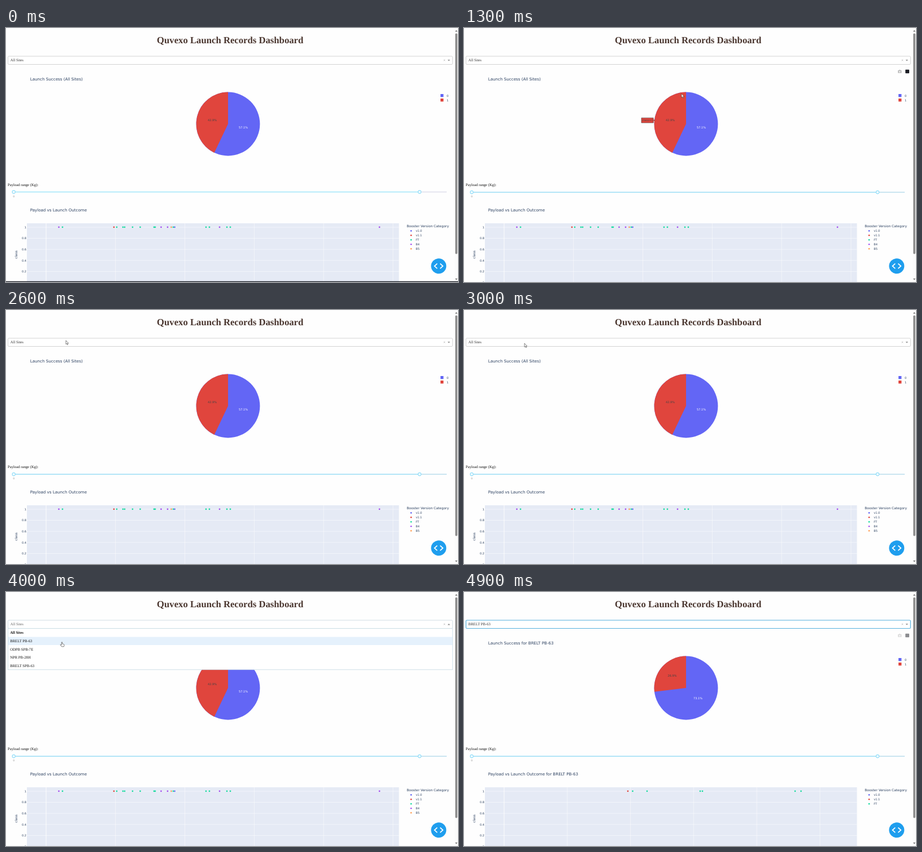
Write an HTML page that moves like this. It is 800x450 px and loops after 5 s.

```html
<!DOCTYPE html>
<html lang="en">
<head>
<meta charset="utf-8">
<title>Launch Records Dashboard</title>
<style>
html, body { margin: 0; width: 100%; height: 100%; overflow: hidden; background: #fefefe; }
svg { display: block; width: 800px; height: 450px; text-rendering: geometricPrecision; }
.serif { font-family: "Liberation Serif", "Times New Roman", serif; }
.sans { font-family: "DejaVu Sans", Verdana, sans-serif; }
</style>
</head>
<body>
<svg id="stage" viewBox="0 0 800 450"></svg>
<script>
const LOOP = 5000, STEP = 100;
const OPEN = 3400, PICK = 4400, UPDATE = 4500;
const BLUE = '#6366f5', RED = '#e0453d', GREEN = '#18dba0', PURPLE = '#a34ef0', ORANGE = '#ffa15a';
const NAVY = '#2a3f5f';
const SITES = ['All Sites', 'BRELT PB-63', 'ODPB SPB-7E', 'NPR PB-28H', 'BRELT SPB-63'];
const BOOSTERS = [['v1.0', BLUE], ['v1.1', RED], ['FT', GREEN], ['B4', PURPLE], ['B5', ORANGE]];

const ALL = {
  title: '', share: .571, labels: [420, 176.5, 365, 163.5],
  grid: [71, 122.8], boosters: 5,
  dots: [[PURPLE, 93.5, 274.5, 286, 378, 661], [RED, 191],
    [GREEN, 100, 196, 207, 210, 224, 237.5, 262, 264, 296, 354, 360, 391, 397],
    [ORANGE, 292.5], [BLUE, 298.5]]
};
const ONE = {
  title: ' for ' + SITES[1], share: .731, labels: [414, 188.5, 368.5, 148.5],
  grid: [71, 111.8], boosters: 3,
  dots: [[RED, 290], [GREEN, 298.5, 324, 418, 422, 586, 596.5]]
};

// Pointer path: time, x, y
const PATH = [[100, 430, 455], [600, 385, 116.5], [1300, 385, 116.5], [1800, 287, 87.5],
  [2400, 109, 53], [2600, 106, 54], [3000, 107, 59], [3400, 107, 59], [3500, 106, 62],
  [3900, 106, 63], [4000, 99, 88.5], [4400, 99, 88.5], [4500, 90, 90], [4700, -20, 95]];

const rect = (x, y, w, h, fill, more = '') =>
  `<rect x="${x}" y="${y}" width="${w}" height="${h}" fill="${fill}" ${more}/>`;
const circle = (x, y, r, fill, more = '') =>
  `<circle cx="${x}" cy="${y}" r="${r}" fill="${fill}" ${more}/>`;
const path = (d, fill, more = '') => `<path d="${d}" fill="${fill}" ${more}/>`;
const line = (d, color, width) => path(d, 'none', `stroke="${color}" stroke-width="${width}"`);
const text = (s, x, y, size, fill, font = 'sans', more = '') =>
  `<text x="${x}" y="${y}" font-size="${size}" fill="${fill}" class="${font}" ${more}>${s}</text>`;
const MID = 'text-anchor="middle"', END = 'text-anchor="end"';

function pointerAt(t) {
  const i = PATH.findIndex(p => p[0] > t);
  if (i < 1) return null;
  const [a, b] = [PATH[i - 1], PATH[i]];
  const k = (t - a[0]) / (b[0] - a[0]);
  return [a[1] + (b[1] - a[1]) * k, a[2] + (b[2] - a[2]) * k];
}

function pie({ title, share, labels: [bx, by, rx, ry] }) {
  const cx = 393, cy = 170, r = 56.4, a = share * 2 * Math.PI;
  const x = cx + r * Math.sin(a), y = cy - r * Math.cos(a);
  const pct = v => (v * 100).toFixed(1) + '%';
  return text('Launch Success' + (title || ' (All Sites)'), 42.7, 93, 7.14, NAVY) +
    circle(cx, cy, r, BLUE) +
    path(`M${cx} ${cy}L${x} ${y}A${r} ${r} 0 0 1 ${cx} ${cy - r}Z`, RED) +
    text(pct(share), bx, by + 1.8, 5.04, '#fff', 'sans', MID) +
    text(pct(1 - share), rx, ry + 1.8, 5.04, '#444', 'sans', MID) +
    [BLUE, RED].map((c, i) => rect(769, 117 + 8 * i, 5.3, 5.3, c) +
      text(i, 780, 121.7 + 8 * i, 5.04, NAVY)).join('');
}

function scatter({ title, grid: [start, gap], boosters, dots }) {
  let s = text('Payload vs Launch Outcome' + title, 42.7, 325, 7.1, NAVY) +
    rect(37, 346, 658.5, 104, '#e5eaf5');
  for (let x = start; x < 695; x += gap)
    s += line(`M${x} 346V450`, '#fff', x === start ? .9 : .5);
  for (let i = 0; i < 6; i++) {
    const y = 353 + 19.6 * i;
    s += line(`M37 ${y}H695.5`, '#fff', .5) +
      text(+(1 - i / 5).toFixed(1), 36, y + 1.8, 5.04, NAVY, 'sans', END);
  }
  s += text('class', 0, 0, 5.88, NAVY, 'sans', MID + ' transform="translate(20 401.5) rotate(-90)"');
  for (const [color, ...xs] of dots)
    s += xs.map(x => circle(x, 352.8, 1.4, color)).join('');
  s += text('Booster Version Category', 709.3, 353.3, 5.86, NAVY);
  return s + BOOSTERS.slice(0, boosters).map(([name, color], i) =>
    circle(717, 359.4 + 7.95 * i, 1.35, color) +
    text(name, 725.3, 361.3 + 7.95 * i, 5.04, NAVY)).join('');
}

function slider(first) {
  const y = first ? 290.5 : 291;
  const knob = x => circle(x, y, 2.6, '#fff', 'stroke="#8fdcf8" stroke-width="1.1"');
  return text('Payload range (Kg):', 3, 279.7, 6.7, '#111', 'serif') +
    line(`M732 ${y}H780`, first ? '#e6e6f0' : '#b9dcec', first ? 2 : 1.5) +
    line(`M14 ${y}H732`, first ? '#b5ecfb' : '#9adcf5', first ? 2 : 1.6) +
    knob(13.7) + knob(732) + text('0', 13.7, 300, 5, '#888', 'serif', MID);
}

function dropdown(t, open, row) {
  const picked = t >= PICK;
  let s = rect(3.5, 50, 786.8, 14.5, '#fff', picked
    ? 'rx="1.5" stroke="#55b0de" stroke-width="1.2"'
    : `rx="1.5" stroke="${open ? '#c5d3dc' : '#c8c8c8'}" stroke-width=".8"`);
  s += text(SITES[picked ? 1 : 0], 7.7, 59.3, 6.7, open ? '#666' : '#333', 'serif') +
    line('M774.6 55.8l2.6 2.6m0 -2.6l-2.6 2.6', '#aaa', .6) +
    path(open ? 'M781.6 58.4h4.4l-2.2 -2.3Z' : 'M781.6 56.2h4.4l-2.2 2.3Z', '#888');
  if (!open) return s;
  if (t < OPEN + 500) s += line('M8 54V60', '#222', .6);
  s += rect(3.5, 64.7, 786.8, 73, '#fff', 'stroke="#c5dbe4" stroke-width=".8"') +
    rect(4, 65 + 14.6 * row, 786, 14.4, '#e5f1fc');
  return s + SITES.map((name, i) => text(name, 7.2, 74.3 + 14.6 * i, 6.7, '#111', 'serif',
    i ? '' : 'font-weight="bold"')).join('');
}

function toolbar(t) {
  const alpha = t >= 4900 ? .5 : t >= 4600 || (t >= 400 && t < 2100) ? 1 : 0;
  return alpha && `<g opacity="${alpha}">` +
    path('M768 75h1.6l.7 -1h1.8l.7 1h1.6v4.8h-6.4Z', '#bbb') + circle(771.2, 77.3, 1.4, '#fff') +
    circle(771.2, 77.3, .7, '#bbb') + rect(781.2, 73.8, 6.8, 6.4, '#1b1d24', 'rx=".8"') + '</g>';
}

const tooltip = () =>
  path('M314 159.2H335.2V162L337.5 163.6L335.2 165.2V168H314Z', RED, 'stroke="#444" stroke-width=".6"') +
  text('class=1', 315.3, 165.4, 4.9, '#444');

const chrome = () =>
  rect(794, 0, 6, 450, '#fbfbfb') + rect(795.2, 9.5, 3.6, 391, '#8a8a8a', 'rx="1.8"') +
  path('M795 6.5h4l-2 -3Z', '#777') + path('M795 443.8h4l-2 3Z', '#777') +
  circle(765.8, 421.8, 13.5, '#1f9eee') +
  line('M763.2 417.4L758.4 421.8L763.2 426.2M768.4 417.4L773.2 421.8L768.4 426.2', '#fff', 1.7);

function pointer([x, y], hand) {
  const d = hand
    ? 'M-.7 .5Q0 -.5 .7 .5V3.3L3.6 4.2Q4.3 4.6 4.1 5.6L3.4 8.3H-.6L-2.8 5.3Q-2.9 4.3 -1.9 4.6L-.7 5.4Z'
    : 'M0 0V6.6L1.5 5.3L2.6 7.7L3.6 7.2L2.6 5H4.6Z';
  return path(d, '#fff', `stroke="#333" stroke-width=".6" transform="translate(${x} ${y})"`);
}

function render(t) {
  const first = t < STEP, open = t >= OPEN && t < PICK;
  const data = t < UPDATE ? ALL : ONE;
  const pos = pointerAt(t);
  const row = pos ? Math.max(0, Math.floor((pos[1] - 65) / 14.6)) : 0;
  return rect(0, 0, 800, 450, '#fefefe') +
    text('Quvexo Launch Records Dashboard', 396.7, 26.6, 16.7, '#4a362f', 'serif', MID + ' font-weight="bold"') +
    pie(data) + (toolbar(t) || '') + (t >= 500 && t < 1400 ? tooltip() : '') +
    slider(first) + scatter(data) + dropdown(t, open, row) + chrome() +
    (first ? rect(0, 448.7, 800, 1.3, '#1c2027') : '') +
    (pos ? pointer(pos, open && pos[1] > 65) : '');
}

const stage = document.getElementById('stage');
const begin = performance.now();
let shown = -1;
function tick() {
  const t = Math.floor((performance.now() - begin) % LOOP / STEP) * STEP;
  if (t !== shown) stage.innerHTML = render(shown = t);
  requestAnimationFrame(tick);
}
tick();
</script>
</body>
</html>
```
